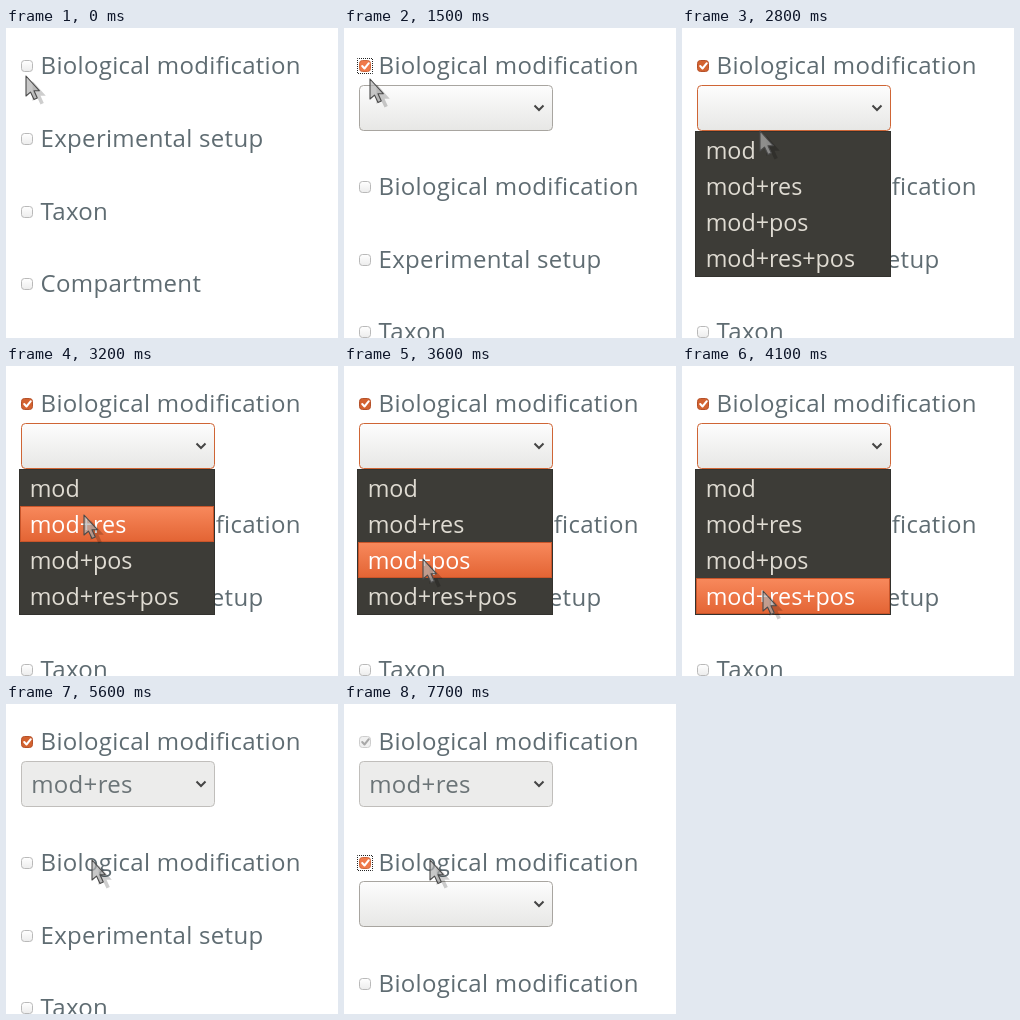
Write an HTML page that moves like this. It is 332 by 310 pixels and loops after 8 s.

```html
<!DOCTYPE html>
<html lang="en">
<head>
<meta charset="utf-8">
<title>Nested form options</title>
<style>
  html, body { margin: 0; width: 100%; height: 100%; overflow: hidden; background: #fff; }
  svg { display: block; width: 332px; height: 310px; }
  text { font: 24px "Open Sans", "Noto Sans", sans-serif; letter-spacing: .3px; fill: #5f6c72; }
  .off { display: none; }

  .box { fill: url(#paper); stroke: #b9b9b9; }
  .tick { fill: none; stroke: none; stroke-width: 2; stroke-linecap: round; stroke-linejoin: round; }
  .ring { fill: none; stroke: none; stroke-dasharray: 1 1; stroke-dashoffset: .5; }
  .press .box { fill: #d4d4d4; stroke: #8a8a8a; }
  .on .box { fill: #d3622f; stroke: #b5512a; }
  .on .tick { stroke: #fff; }
  .hover .box { fill: #f07a4a; stroke: #cf6a40; }
  .focus .ring { stroke: #222; }
  .locked .box { fill: #f0f0f0; stroke: #cdcdcd; }
  .locked .tick { stroke: #a8a8a8; }

  .field { fill: url(#button); stroke: #a8a5a0; }
  .arrow { fill: none; stroke: #454545; stroke-width: 2; }
  .value { fill: #6b7477; }
  .active .field { stroke: #cf6535; }
  .fixed .field { fill: #ececeb; stroke: #c0bebb; }

  #menu text { font-size: 23.3px; letter-spacing: 0; fill: #dfdbd2; }
  #menu .hot text { fill: #fff; }
  #menu .bar { fill: none; }
  #menu .hot .bar { fill: url(#glow); stroke: #c9552a; }
</style>
</head>
<body>
<svg viewBox="0 0 332 310">
  <defs>
    <linearGradient id="paper" x2="0" y2="1">
      <stop stop-color="#fff"/><stop offset="1" stop-color="#ececec"/>
    </linearGradient>
    <linearGradient id="button" x2="0" y2="1">
      <stop stop-color="#fdfdfd"/><stop offset="1" stop-color="#e7e7e5"/>
    </linearGradient>
    <linearGradient id="glow" x2="0" y2="1">
      <stop stop-color="#f8895c"/><stop offset="1" stop-color="#e36434"/>
    </linearGradient>
    <filter id="soft" x="-50%" y="-50%" width="200%" height="200%">
      <feGaussianBlur stdDeviation=".7"/>
    </filter>
    <path id="pointer" d="M0 0V20L4.5 16.1 8 23.6 11.3 22 8 14.7H13.3Z"/>
  </defs>
  <g id="done"></g>
  <g id="list"></g>
  <g id="menu">
    <rect x="13.5" y="103.5" width="195" height="145" fill="#3d3c37" stroke="#33322e"/>
  </g>
  <g id="cursor">
    <use href="#pointer" x="6.5" y="5" opacity=".19" filter="url(#soft)"/>
    <use href="#pointer" fill="#b0b0b0" fill-opacity=".7" stroke="#4a4a4a" stroke-width="1.1" stroke-linejoin="round"/>
  </g>
</svg>
<script>
const LOOP = 8000, TICK = 100;
const BLOCK = 120.7, PITCH = 72.6, ROW_Y = 38.4, SELECT_Y = 57.2;
const labels = ["Biological modification", "Experimental setup", "Taxon", "Compartment"];
const options = ["mod", "mod+res", "mod+pos", "mod+res+pos"];

// [tick, x, y] of the pointer tip, straight lines in between
const path = [
  [0, 20, 48], [1, 20, 40], [2, 20, 40], [3, 20, 39], [14, 20, 39], [15, 26, 51],
  [17, 66, 70], [19, 105, 84], [24, 105, 84], [25, 77, 85], [26, 77, 85], [28, 78, 103],
  [32, 78, 149], [35, 78, 176], [37, 80, 209], [38, 80, 209], [41, 81, 225],
  [42, 81, 225], [44, 82, 202], [47, 85, 131], [49, 86, 150], [55, 86, 150], [56, 86, 156]
];
// [tick, highlighted option]
const marks = [[0, -1], [29, 0], [32, 1], [35, -1], [36, 2], [40, 3], [44, 2], [46, 1]];

const $ = id => document.getElementById(id);
const moveTo = (el, x, y) => el.setAttribute("transform", `translate(${x} ${y})`);

const row = label => `<g class="row">
  <rect class="box" x="15.5" y="-5.5" width="11" height="11" rx="3"/>
  <path class="tick" d="M18.2 0 20.5 2.5 24.8 -2.8"/>
  <rect class="ring" x="13.5" y="-7.5" width="15" height="15"/>
  <text x="34.6" y="8">${label}</text></g>`;

const block = () => `<g>${row(labels[0])}
  <g class="select"><rect class="field" x="15.5" y=".5" width="193" height="45" rx="4"/>
  <path class="arrow" d="M190.5 20.5 195 25 199.5 20.5"/>
  <text class="value" x="25.2" y="32"></text></g></g>`;

$("done").innerHTML = block() + block();
$("list").innerHTML = labels.map(row).join("");
$("menu").innerHTML += options.map((s, i) => `<g class="option">
  <rect class="bar" x="14.5" y="${104.5 + i * 36}" width="193" height="35"/>
  <text x="23.7" y="${131 + i * 36}">${s}</text></g>`).join("");

const blocks = [...$("done").children];
const [row1, row2] = blocks.map(b => b.querySelector(".row"));
const [select1, select2] = blocks.map(b => b.querySelector(".select"));
const value = select1.querySelector(".value");
const rows = [...$("list").children];
const items = [...document.querySelectorAll(".option")];

[row1, row2].forEach((el, i) => moveTo(el, 0, Math.round(ROW_Y + i * BLOCK)));
[select1, select2].forEach((el, i) => moveTo(el, 0, Math.floor(SELECT_Y + i * BLOCK)));

const setClass = (el, base, flags) => el.setAttribute("class",
  [base, ...Object.keys(flags).filter(k => flags[k])].join(" "));

function pointerAt(t) {
  const i = path.findIndex(p => p[0] > t);
  if (i < 0) return path[path.length - 1].slice(1);
  const [t0, x0, y0] = path[i - 1], [t1, x1, y1] = path[i];
  const k = (t - t0) / (t1 - t0);
  return [Math.round(x0 + (x1 - x0) * k), Math.round(y0 + (y1 - y0) * k)];
}

function draw(t) {
  const opened = t < 11 ? 0 : t < 77 ? 1 : 2;
  blocks.forEach((b, i) => setClass(b, "", { off: i >= opened }));
  rows.forEach((el, i) => moveTo(el, 0, Math.round(ROW_Y + opened * BLOCK + i * PITCH)));

  const clicked = t === 10;
  setClass(rows[0], "row", { press: t === 9, on: clicked, hover: clicked, focus: clicked });
  setClass(row1, "row", { on: true, hover: t < 16, focus: t < 21, locked: t >= 77 });
  setClass(row2, "row", { on: true, hover: true, focus: true });
  setClass(select1, "select", { active: t >= 21 && t < 55, fixed: t >= 55 });
  value.textContent = t >= 54 ? options[1] : "";

  setClass($("menu"), "", { off: t < 23 || t >= 54 });
  const hot = marks.filter(m => m[0] <= t).pop()[1];
  items.forEach((el, i) => setClass(el, "option", { hot: i === hot }));
  moveTo($("cursor"), ...pointerAt(t));
}

let last = -1;
function frame() {
  const t = Math.floor(performance.now() % LOOP / TICK);
  if (t !== last) draw(last = t);
  requestAnimationFrame(frame);
}
frame();
</script>
</body>
</html>
```
